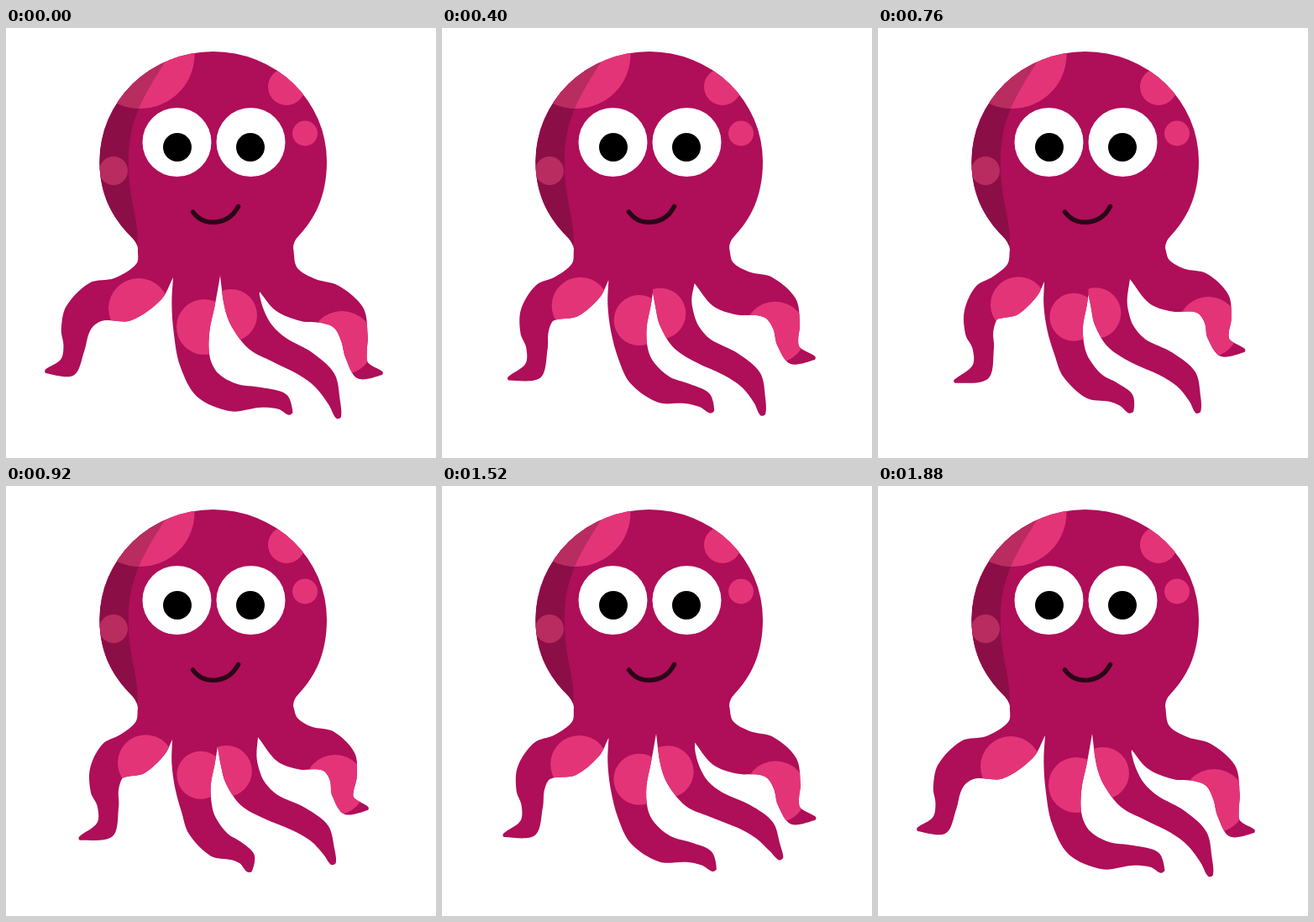
Animation, 512 px wide and 512 px high, one loop 1920 ms. Source, as an HTML page with a canvas:

```html
<!DOCTYPE html>
<html lang="en">
<head>
<meta charset="utf-8">
<title>Octopus</title>
<style>
  html, body { margin: 0; width: 100%; height: 100%; overflow: hidden; background: #fff; }
  canvas { display: block; width: 512px; height: 512px; }
</style>
</head>
<body>
<canvas id="stage" width="512" height="512"></canvas>
<script>
const ctx = document.getElementById('stage').getContext('2d');
const LOOP = 1920, STEP = 40, CYCLE = LOOP - STEP;
const BODY = '#af0e59', SHADE = '#8c0e46', SPOT = '#e43478', SPOT_SHADE = '#b82c60';
const NECK = [342, 262];

// An arm is a spine with half-widths, swinging between a rest and a raised pose.
// The first point of a pose is where the arm joins the arm before it.
// The lift track is [time, amount]; a drift bends the arm further around its peak time.
const ARMS = [
  {
    rest: [157,262, 170,302, 139,323, 108,326, 88,343, 82,362, 81,381, 73,404, 47,409],
    raised: [157,264, 172,300, 153,318, 133,327, 125,342, 124,364, 129,381, 126,410, 95,422],
    widths: [26, 27, 24, 20, 16.5, 12.8, 12.2, 2],
    spot: { rest: [158, 334, 36], raised: [168, 329, 33] },
    lift: [[0, 0], [600, 1], [1520, .55]],
    drift: { x: 0, y: 0, peak: 0, reach: 1, bend: 1 }
  },
  {
    rest: [199,297, 223,329, 221,362, 225,397, 240,425, 271,440, 303,440, 329,445, 339,459],
    raised: [198,302, 223,330, 223,358, 229,384, 238,404, 261,426, 286,433, 304,442, 313,456],
    widths: [25.7, 21.3, 18.5, 18.7, 16.7, 12, 10, 3],
    spot: { rest: [236, 356, 33], raised: [234, 344, 28.5] },
    lift: [[0, 0], [600, 1], [1240, 1]],
    drift: { x: -23, y: 3, peak: 920, reach: 320, bend: 2 }
  },
  {
    rest: [255,295, 281,325, 288,346, 303,368, 325,383, 357,400, 380,420, 391,446, 396,464],
    raised: [249,325, 273,328, 275,346, 284,367, 304,385, 338,401, 362,419, 372,443, 375,459],
    widths: [22, 21.5, 19.7, 16.2, 15.4, 13.8, 7.2, 3],
    spot: { rest: [268, 342, 31], raised: [256, 339, 30] },
    lift: [[0, 0], [600, 1], [1240, 0]],
    drift: { x: 11, y: -29, peak: 1280, reach: 640, bend: 2 }
  },
  {
    rest: [302,314, 334,311, 360,324, 386,329, 408,345, 415,370, 417,390, 425,408, 448,411],
    raised: [300,299, 335,302, 358,312, 384,315, 402,329, 408,349, 409,366, 418,381, 442,384],
    widths: [28.5, 26.5, 24.3, 21, 16, 13, 11.3, 2],
    spot: { rest: [400, 375, 38], raised: [395, 356, 36] },
    lift: [[0, 0], [600, 1], [1240, 1]],
    drift: { x: -11, y: 0, peak: 920, reach: 320, bend: 1 }
  }
];

const mix = (a, b, u) => a.map((v, i) => v + (b[i] - v) * u);
const pairs = list => list.flatMap((x, i) => i % 2 ? [] : [[x, list[i + 1]]]);
const dist = (a, b) => Math.hypot(a[0] - b[0], a[1] - b[1]);

function follow(track, time) {
  const keys = [...track, [CYCLE, track[0][1]]];
  const i = keys.findIndex(key => key[0] > time);
  const [t0, a] = keys[i - 1], [t1, b] = keys[i];
  return a + (b - a) * (time - t0) / (t1 - t0);
}

function pulse(time, peak, reach) {
  const d = Math.min(Math.abs(time - peak) / reach, 1);
  return (1 + Math.cos(Math.PI * d)) / 2;
}

function tangent(pts, i) {
  const a = pts[Math.max(i - 1, 0)], b = pts[i], c = pts[Math.min(i + 1, pts.length - 1)];
  const len = dist(a, b) + dist(b, c);
  return [(c[0] - a[0]) / len, (c[1] - a[1]) / len];
}

// Moves one arm to its place and returns its edge points and spot
function placeArm({ rest, raised, widths, spot, lift, drift }, time) {
  const u = follow(lift, time), v = pulse(time, drift.peak, drift.reach);
  const shift = ([x, y], s) => {
    const k = v * s ** drift.bend;
    return [x + drift.x * k, y + drift.y * k];
  };
  const [root, ...line] = pairs(mix(rest, raised, u));
  const spine = line.map((p, i) => shift(p, i / (line.length - 1)));
  const side = sign => spine.map(([x, y], i) => {
    const [dx, dy] = tangent(spine, i), w = sign * widths[i] / Math.hypot(dx, dy);
    return [x - dy * w, y + dx * w];
  });
  const [x, y, r] = mix(spot.rest, spot.raised, u);
  return { edge: [root, ...side(1), ...side(-1).reverse()], spot: [...shift([x, y], .3), r] };
}

// Continues the path from pts[0] through the other points
function spline(path, pts) {
  for (let i = 0; i < pts.length - 1; i++) {
    const [x, y] = pts[i], [X, Y] = pts[i + 1];
    const m = tangent(pts, i), n = tangent(pts, i + 1), s = dist(pts[i], pts[i + 1]) / 3;
    path.bezierCurveTo(x + m[0] * s, y + m[1] * s, X - n[0] * s, Y - n[1] * s, X, Y);
  }
}

function armClip(pts) {
  const path = new Path2D(), first = pts[0], last = pts.at(-1);
  path.moveTo(...first);
  spline(path, pts);
  path.lineTo(last[0], last[1] - 60);
  path.lineTo(first[0], first[1] - 60);
  path.closePath();
  return path;
}

function outline(edges) {
  const path = new Path2D(), neck = edges[0][0];
  path.moveTo(...neck);
  edges.forEach(pts => spline(path, pts));
  path.quadraticCurveTo(342, 254, 348.5, 247.5);
  path.bezierCurveTo(367, 228, 382, 201, 382, 159);
  path.ellipse(246.7, 159, 135.3, 131, 0, 0, Math.PI, true);
  path.bezierCurveTo(111.4, 201, 129, 228, 148, 247.5);
  path.quadraticCurveTo(156, 255, ...neck);
  path.closePath();
  return path;
}

function dot(x, y, r, color) {
  ctx.fillStyle = color;
  ctx.beginPath();
  ctx.arc(x, y, r, 0, 2 * Math.PI);
  ctx.fill();
}

function inside(path, paint) {
  ctx.save();
  ctx.clip(path);
  paint();
  ctx.restore();
}

const shade = new Path2D('M191 38C173 66 156.5 92 149.5 122C142.5 155 146.5 190 152 215C156 235 158 248 156 259L90 259V20H191Z');
const smile = new Path2D('M222.5 219Q231 231 246 231.3Q267 231 276.5 212.5');

function drawHead() {
  ctx.fillStyle = SHADE;
  ctx.fill(shade);
  dot(160, 31.5, 64.5, SPOT);
  inside(shade, () => dot(160, 31.5, 64.5, SPOT_SHADE));
  dot(128, 170, 17, SPOT_SHADE);
  dot(334, 70, 22, SPOT);
  dot(356, 125.5, 15, SPOT);
}

function drawFace() {
  for (const [x, pupil] of [[203.5, 204], [291.5, 291]]) {
    dot(x, 136, 41, '#fff');
    dot(pupil, 142, 17, '#000');
  }
  ctx.strokeStyle = '#2a0616';
  ctx.lineWidth = 5.5;
  ctx.lineCap = 'round';
  ctx.stroke(smile);
}

function draw(time) {
  const arms = ARMS.map(arm => placeArm(arm, time));
  const roots = [...arms.slice(1).map(arm => arm.edge[0]), NECK];
  arms.forEach((arm, i) => arm.edge.push(roots[i]));
  const body = outline(arms.map(arm => arm.edge));

  ctx.fillStyle = '#fff';
  ctx.fillRect(0, 0, 512, 512);
  ctx.fillStyle = BODY;
  ctx.fill(body);
  inside(body, drawHead);
  for (const { edge, spot } of arms) {
    inside(armClip(edge), () => dot(...spot, SPOT));
  }
  drawFace();
}

const start = performance.now();
function tick() {
  const time = (performance.now() - start) % LOOP;
  draw(Math.floor(time / STEP) * STEP % CYCLE);
  requestAnimationFrame(tick);
}
tick();
</script>
</body>
</html>
```
